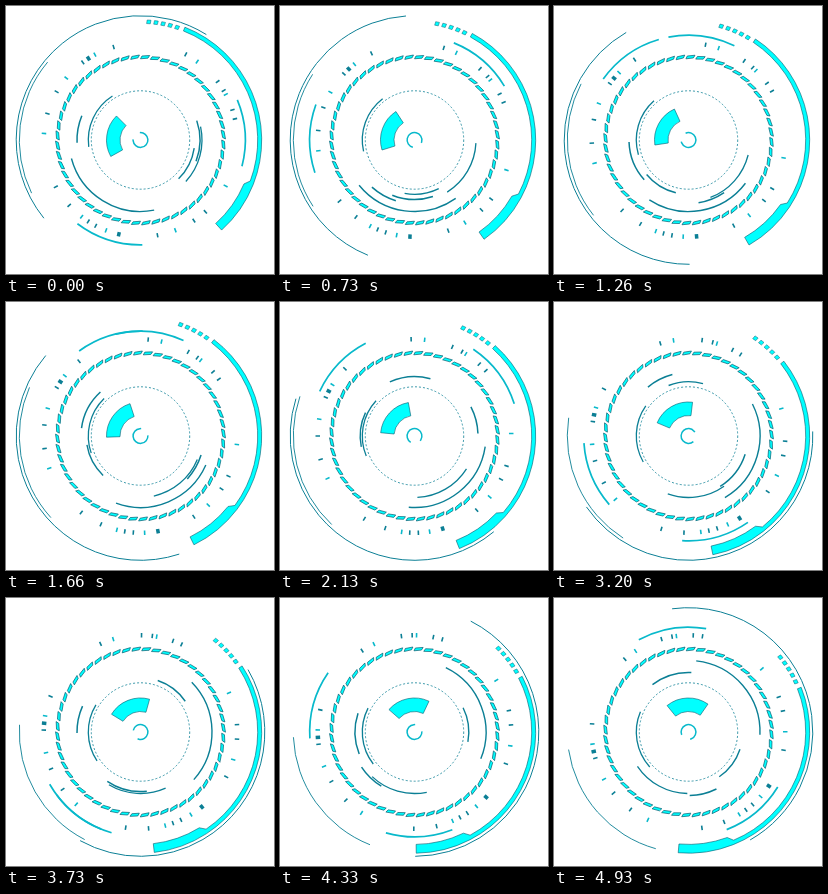
An HTML page with a canvas that plays this animation: 268 px wide and 268 px high, repeating every 5000 ms.

```html
<!DOCTYPE html>
<html lang="en">
<head>
<meta charset="utf-8">
<title>Rotating dial</title>
<style>
  html, body { margin: 0; width: 100%; height: 100%; overflow: hidden; background: #fff; }
  canvas { display: block; width: 268px; height: 268px; }
</style>
</head>
<body>
<canvas id="dial" width="268" height="268"></canvas>
<script>
const ctx = document.getElementById('dial').getContext('2d');
const LOOP = 5000, STEP = 1000 / 15;
const CX = 134.5, CY = 134;
const CYAN = '#00ffff', TEAL = '#0b7f95', DARK = '#075a6e', AQUA = '#08b9cb';
const rad = deg => deg * Math.PI / 180;

function arc(r, from, to, width, color, dash = []) {
  ctx.beginPath();
  ctx.arc(0, 0, r, rad(from), rad(to));
  ctx.lineWidth = width;
  ctx.strokeStyle = color;
  ctx.setLineDash(dash);
  ctx.stroke();
  ctx.setLineDash([]);
}

const centred = (r, mid, span, width, color) =>
  arc(r, mid - span / 2, mid + span / 2, width, color);

// Closed shape through polar points [radius, degrees]
function polar(points) {
  ctx.beginPath();
  for (const [r, a] of points) ctx.lineTo(r * Math.cos(rad(a)), r * Math.sin(rad(a)));
  ctx.closePath();
}

function paint(edge = 0.6) {
  ctx.fillStyle = CYAN;
  ctx.fill();
  ctx.lineWidth = edge;
  ctx.strokeStyle = DARK;
  ctx.stroke();
}

function band(inner, outer, from, to) {
  ctx.beginPath();
  ctx.arc(0, 0, outer, rad(from), rad(to));
  ctx.arc(0, 0, inner, rad(to), rad(from), true);
  ctx.closePath();
  paint();
}

function gauge(turn) {
  for (let i = 0; i < 5; i++) {
    const a = turn - 86 + i * 3.5;
    polar([[116.6, a - 1], [120.2, a - 0.8], [120.2, a + 1], [116.6, a + 0.8]]);
    paint(0.5);
  }
  ctx.beginPath();
  ctx.arc(0, 0, 121.2, rad(turn - 68.5), rad(turn + 48));
  ctx.arc(0, 0, 112.4, rad(turn + 48), rad(turn + 23), true);
  ctx.arc(0, 0, 117.2, rad(turn + 20.5), rad(turn - 68.5), true);
  ctx.closePath();
  paint();
}

function rope(turn) {
  const count = 52, pitch = 360 / count;
  for (let i = 0; i < count; i++) {
    const a = turn + i * pitch;
    polar([[81.2, a], [84, a + 1], [85, a + 6.2], [82.2, a + 5.2]]);
    paint(0.7);
  }
}

const marks = [
  184, 196, 210, 220, 233.5, 237, 242, 254, 298, 306, 323, 329.4, 332, 342, 347.5,
  28.5, 48, 56.6, 69, 80, 102.5, 111, 117.7, 122.8, 127.6, 137.6, 151.2
];

function ticks(turn) {
  marks.forEach((mark, i) => {
    ctx.save();
    ctx.rotate(rad(mark + turn));
    const bold = mark === 237 || mark === 102.5;
    ctx.fillStyle = i % 3 ? TEAL : AQUA;
    ctx.fillRect(94.5, -1, 4.5, bold ? 3.5 : 1.6);
    ctx.restore();
  });
}

function draw(t) {
  ctx.setTransform(1, 0, 0, 1, 0, 0);
  ctx.clearRect(0, 0, 268, 268);
  ctx.translate(CX, CY);

  // Outer lines
  arc(124.3, 141 - 38 * t - 2.1 * t * t, 302 - 49 * t, 1, TEAL);
  centred(121.2, 187 - 9.8 * t, 66, 0.9, TEAL);
  gauge(9.5 * t);

  // Counter-rotating pair
  centred(104.8, 108 + 98.5 * t + 1.1 * t * t, 38, 1.7, AQUA);
  centred(104.8, -4 - 62 * t, 37, 1.7, AQUA);
  ticks(-14 * t);
  rope(9.5 * t);

  // Inner arcs: heavier where two of them pass each other
  centred(71.5, 122 - 33 * t, 86, 1.4, TEAL);
  centred(63.5, 190 - 96 * t, 25, 1.5, TEAL);
  centred(61.5, 15 + 21 * t, 55, 1.3, TEAL);
  centred(54.3, 27 + 75 * t, 37, 1.4, TEAL);
  centred(59.5, 1 + 124 * t, 40, 1.5, TEAL);
  arc(49.2, 0, 360, 0.8, TEAL, [2, 2]);
  centred(52.2, 205 - 7 * t, 65, 1.3, TEAL);

  const wedge = 188 + 16.2 * t;
  band(20.5, 34, wedge - 37, wedge + 37);
  centred(7.4, 45 + 270 * t, 280, 1.5, AQUA);
}

function frame() {
  const now = performance.now() % LOOP;
  draw(Math.floor((now + 7) / STEP) % 75 / 15);
  requestAnimationFrame(frame);
}
frame();
</script>
</body>
</html>
```
